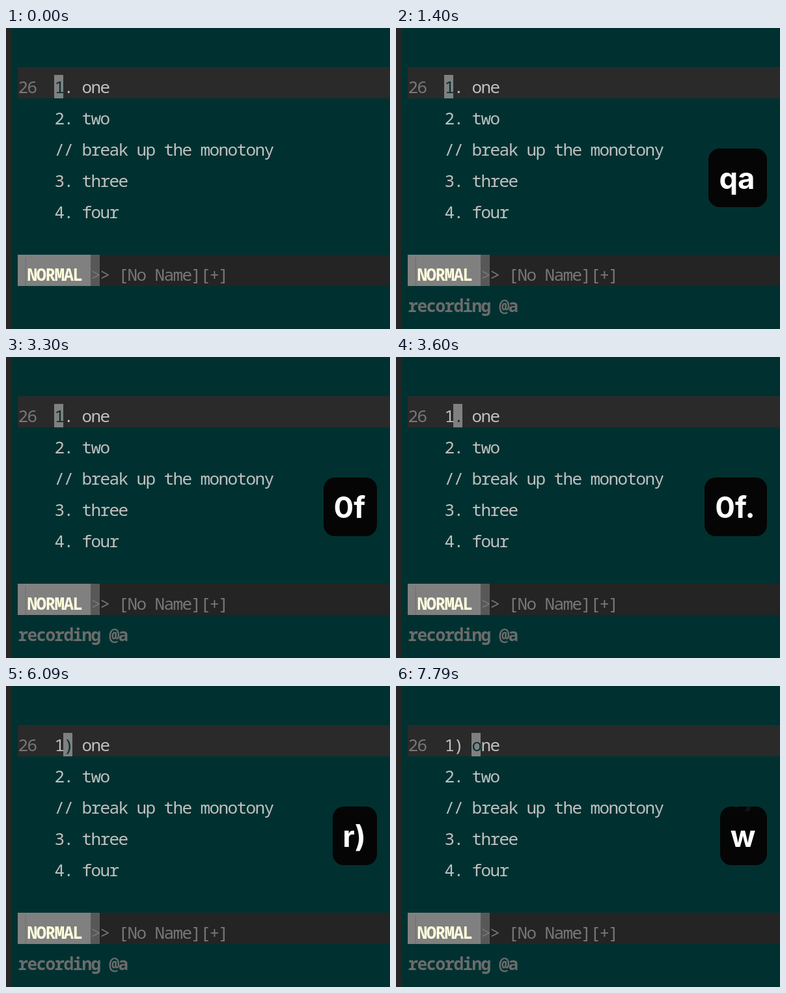
An HTML page for the animation above (8000 ms loop, 590x462 px).

```html
<!DOCTYPE html>
<html lang="en">
<head>
<meta charset="utf-8">
<title>Recording a macro</title>
<style>
  html, body { margin: 0; width: 100%; height: 100%; overflow: hidden; background: #003130; }
  svg { display: block; width: 590px; height: 462px; }
  text { white-space: pre; }
  .mono { font: 400 26px "Noto Sans Mono", "DejaVu Sans Mono", monospace; letter-spacing: -1.6px; fill: #c0c0c0; }
  .dim { fill: #777; }
  .bold { font-weight: 700; }
  .key { font: 700 45.5px Inter, "Liberation Sans", sans-serif; text-anchor: middle; fill: #fff; }
</style>
</head>
<body>
<svg id="stage" viewBox="0 0 590 462">
  <rect width="590" height="462" fill="#003130"/>
  <rect width="8" height="462" fill="#262626"/>
  <rect x="18" y="60" width="572" height="48" fill="#2a2a2a"/>
  <rect x="18" y="348" width="572" height="48" fill="#242424"/>
  <rect x="18" y="348" width="112" height="48" fill="#808080"/>
  <rect x="130" y="348" width="14" height="48" fill="#585858"/>
  <rect x="29" y="352" width="2" height="44" fill="#777"/>
  <g id="screen"></g>
  <rect id="cursor" y="72" width="14" height="36" fill="#808080"/>
  <g id="overlay">
    <clipPath id="clip"><rect id="clipBox" y="185" height="90" rx="17"/></clipPath>
    <rect id="box" y="185" height="90" rx="17" fill="#050505"/>
    <g clip-path="url(#clip)">
      <text id="ghost" class="key" x="534">r)</text>
      <text id="keys" class="key" y="247"></text>
    </g>
  </g>
</svg>
<script>
const LOOP = 8000, CELL = 14, LEFT = 18, RIGHT = 570, INSET = 0.4;
const $ = id => document.getElementById(id);
const NS = "http://www.w3.org/2000/svg";

function put(col, top, str, cls = "") {
  const el = document.createElementNS(NS, "text");
  el.setAttribute("class", "mono " + cls);
  el.setAttribute("x", LEFT + col * CELL + INSET);
  el.setAttribute("y", top + 40);
  el.textContent = str;
  $("screen").append(el);
  return el;
}

put(0, 60, "26", "dim");
const first = put(4, 60, "");
["2. two", "// break up the monotony", "3. three", "4. four"]
  .forEach((line, i) => put(4, 108 + i * 48, line));
put(1, 348, "NORMAL", "bold").style.fill = "#ffffdf";
put(8, 348, ">>", "dim");
put(11, 348, "[No Name][+]", "dim");
const rec = put(0, 396, "recording @a", "dim bold");
rec.style.fill = "#6c6c6c";

const under = put(4, 60, "");
under.style.fill = "#003130";
$("cursor").after(under);

// Each step changes only the listed properties.
const start = { line: "1. one", col: 0, keys: "", left: RIGHT, alpha: 1, rec: false, rise: 0, trace: 0 };
const steps = [
  [0, {}],
  [1200, { keys: "q", left: 507, alpha: 0.3 }],
  [1300, { keys: "qa", left: 480, alpha: 0.75, rec: true }],
  [1400, { alpha: 1 }],
  [2900, { keys: "0", left: 506, alpha: 0.26 }],
  [3000, { alpha: 0.75 }],
  [3100, { alpha: 1 }],
  [3300, { keys: "0f", left: 488 }],
  [3500, { keys: "0f.", left: 474, col: 1 }],
  [5190, { keys: "r", left: 518, alpha: 0 }],
  [5290, { alpha: 0.35 }],
  [5390, { alpha: 0.75 }],
  [5490, { alpha: 1 }],
  [5990, { keys: "r)", left: 502, line: "1) one" }],
  [7590, { keys: "w", left: 498, col: 3, alpha: 0.26, rise: 32, trace: 0.25 }],
  [7690, { alpha: 0.75, rise: 48, trace: 0.12 }],
  [7790, { alpha: 1, rise: 61, trace: 0.06 }]
];
let last = start;
const states = steps.map(([at, change]) => last = { ...last, ...change, at });

function draw(t) {
  const s = states.findLast(step => step.at <= t);
  const x = LEFT + (4 + s.col) * CELL;
  first.textContent = s.line;
  $("cursor").setAttribute("x", x);
  under.setAttribute("x", x + INSET);
  under.textContent = s.line[s.col];
  rec.style.opacity = s.rec ? 1 : 0;

  $("overlay").style.display = s.keys ? "" : "none";
  for (const id of ["box", "clipBox"]) {
    $(id).setAttribute("x", s.left);
    $(id).setAttribute("width", RIGHT - s.left);
  }
  $("keys").textContent = s.keys;
  $("keys").setAttribute("x", (s.left + RIGHT) / 2 - 1);
  $("keys").style.opacity = s.alpha;
  $("ghost").setAttribute("y", 247 - s.rise);
  $("ghost").style.opacity = s.trace;
}

const origin = performance.now();
function tick() {
  draw((performance.now() - origin) % LOOP);
  requestAnimationFrame(tick);
}
tick();
</script>
</body>
</html>
```
